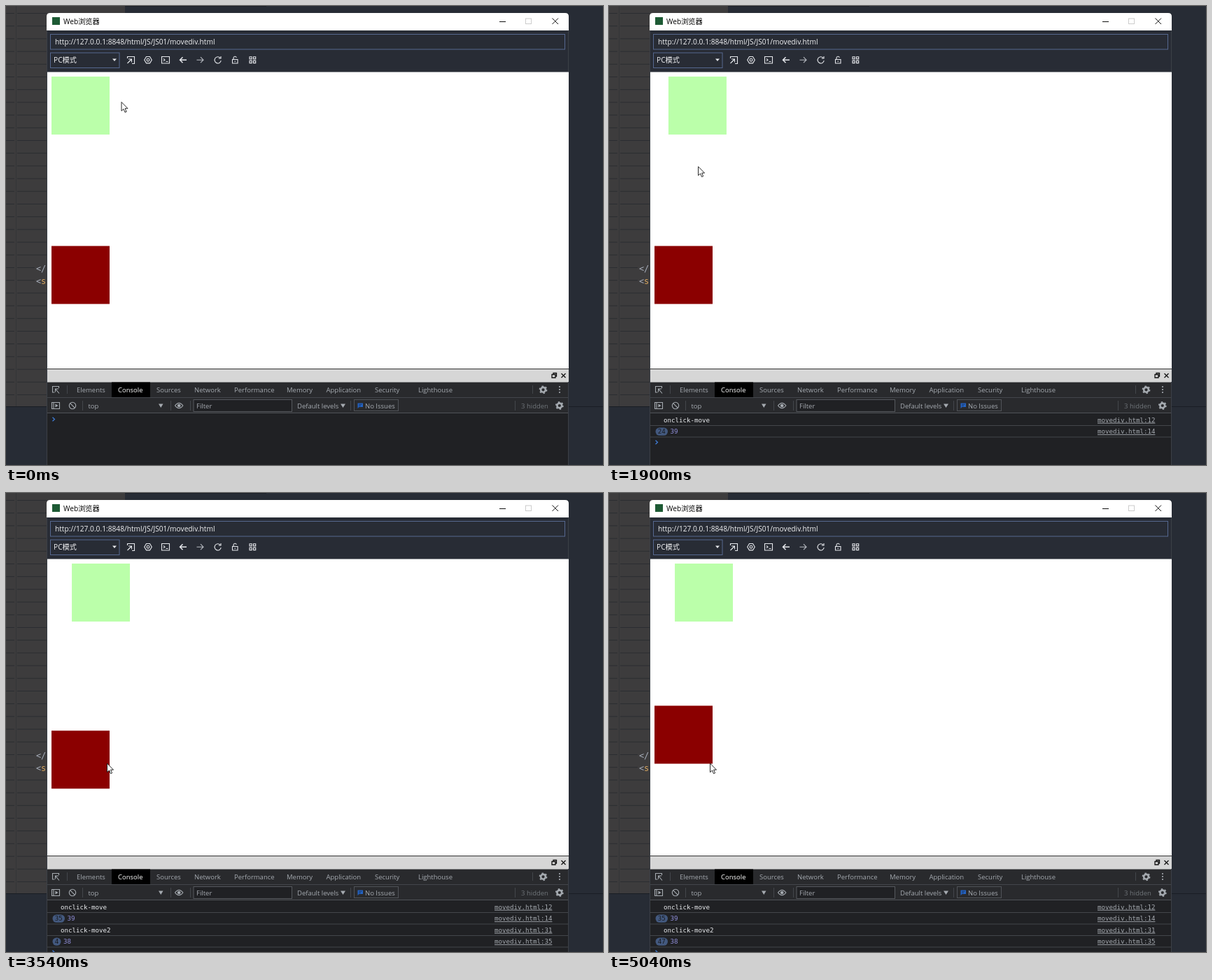
Write an HTML page that moves like this. It is 853 by 657 pixels and loops after 5110 ms.

```html
<!DOCTYPE html>
<html lang="zh-CN">
<head>
<meta charset="utf-8">
<title>movediv</title>
<style>
html, body { margin: 0; width: 100%; height: 100%; overflow: hidden; background: #272c35; }
svg { display: block; width: 100%; height: 100%; }
text { font: 10.2px 'Open Sans', 'Noto Sans CJK SC', 'Noto Sans CJK', sans-serif; white-space: pre; }
.dev text { font-size: 9.5px; fill: #a5aab0; }
.log text, .code text { font-family: 'DejaVu Sans Mono', monospace; }
.log text { font-size: 9.15px; }
.log .msg { fill: #e8eaed; }
.log .link { fill: #a5aab0; text-decoration: underline; }
.log .num { fill: #9190dc; }
.log .count { fill: #191b20; }
.code text { font-size: 11.8px; fill: #a9b0bd; }
.line { fill: none; stroke: #e6e8ec; stroke-width: 1.1; }
.dim { stroke: #a5aab0; }
.rule { fill: none; stroke: #43464b; }
</style>
</head>
<body>
<svg viewBox="0 0 853 657">
  <!-- editor behind the window -->
  <rect width="853" height="657" fill="#272c35"/>
  <rect width="170" height="573" fill="#3d3c3d"/>
  <path d="M170 .5H372" stroke="#1b1f26"/>
  <path d="M0 573.5H853" stroke="#191d24"/>
  <path id="grid" stroke="#2b2d31" fill="none"/>
  <path d="M14.5 0V573" stroke="#343537"/>
  <g class="code">
    <text x="43" y="380">&lt;/</text>
    <text x="43" y="398">&lt;<tspan fill="#d9a760">s</tspan></text>
  </g>

  <!-- browser window -->
  <path d="M58 657V15q0-5 5-5H799q5 0 5 5V657Z" fill="#fff"/>
  <rect x="66" y="16" width="11" height="11" fill="#1d5a34"/>
  <text x="82" y="25.5">Web浏览器</text>
  <g fill="none" stroke="#111">
    <path d="M705 22.5H714M780.500 17.500l8.500 8.500m0-8.500l-8.500 8.500"/>
    <rect x="742.500" y="18" width="8" height="7.500" stroke="#ccc"/>
  </g>
  <rect x="58" y="35" width="746" height="59.500" fill="#282c35"/>
  <g fill="none" stroke="#56688f">
    <rect x="63.500" y="40.500" width="735" height="21.500"/>
    <rect x="63.500" y="67" width="98.500" height="21.500"/>
  </g>
  <text x="70" y="54.700" fill="#f0f1f3">http://127.0.0.1:8848/html/JS/JS01/movediv.html</text>
  <text x="68" y="81.200" fill="#f0f1f3">PC模式</text>
  <path d="M152 75.500h6l-3 3.500Z" fill="#e6e8ec"/>
  <g class="line">
    <path d="M173.500 75V72.500H183.500V82.500H180M173.500 82l6-6m-4.500 0h4.500v4.500"/>
    <path d="M200.500 72.500h5l2.800 4.700-2.800 4.700h-5l-2.800-4.700Z"/>
    <circle cx="203" cy="77.200" r="1.900"/>
    <path d="M222.500 72.500h11v9.500h-11ZM225 75.500l2 1.700-2 1.700M228.500 79.500h3"/>
    <path d="M258 77.200H248.500m4-4l-4 4 4 4" stroke-width="1.500"/>
    <path d="M272.500 77.200H282m-4-4l4 4-4 4" stroke="#b9bdc4"/>
    <path d="M306 74.200a4.600 4.600 0 1 0 1.200 4M307 72v3h-3.200"/>
    <path d="M323.500 76.500h7.500v5.500h-7.500ZM325 76.500V74.500a2.200 2.200 0 0 1 4.300-.7M327.200 78.500v1.600"/>
    <path d="M348 72.700h3.200v3.200h-3.200ZM353.500 72.700h3.200v3.200h-3.200ZM348 78.400h3.200v3.200h-3.200ZM353.500 78.400h3.200v3.200h-3.200Z"/>
  </g>

  <!-- page -->
  <rect id="green" x="65" y="101" width="83" height="83" fill="#bbffaa"/>
  <rect id="red" x="65" y="343.500" width="83" height="83" fill="#8b0000"/>

  <!-- developer tools -->
  <rect x="58" y="519" width="746" height="19.500" fill="#d6d6d6"/>
  <path d="M58 519.500H804" stroke="#333"/>
  <path d="M782 527v-1.500h4.500v4.500h-1.500M780 527.500h5v4.500h-5ZM793.500 526l6 6m0-6l-6 6" fill="none" stroke="#111" stroke-width="1.300"/>
  <rect x="58" y="538.500" width="746" height="44.500" fill="#292a2d"/>
  <rect x="58" y="583" width="746" height="74" fill="#202124"/>
  <rect x="151" y="538.500" width="55" height="21.500" fill="#000"/>
  <path class="rule" d="M58 560.500H804M87.500 543v12M752.500 543v12M109.500 565v14M235.500 565v14M263.500 565v14M492.500 565v14M727.500 565v14"/>
  <path d="M58 582.500H804" stroke="#505358"/>
  <g class="dev">
    <g id="tabs"></g>
    <g class="line dim">
      <path d="M69.500 553H66.500V544.500H75.500V547M70.500 548l5.500 6.500M70.500 552.500V548h4.500"/>
      <path d="M65.500 567.500h11v9h-11ZM68 567.500v9"/>
      <path d="M70.500 569.500l4 2.500-4 2.500Z" fill="#a5aab0" stroke="none"/>
      <circle cx="95" cy="572" r="4.700"/><path d="M91.700 568.700l6.600 6.600"/>
      <path d="M241.500 572q5.700-7.500 11.400 0q-5.700 7.500-11.400 0Z"/>
      <circle cx="247.200" cy="572" r="1.800" fill="#a5aab0"/>
    </g>
    <g id="gears" fill="none" stroke="#a5aab0"></g>
    <path d="M791 545v9.500" stroke="#a5aab0" stroke-width="2.200" stroke-linecap="round" stroke-dasharray="0 4"/>
    <path d="M218 569.500h6.500l-3.250 5.500ZM478 569.500h7l-3.500 5.500Z" fill="#a5aab0"/>
    <rect x="268" y="563.500" width="140.500" height="17" fill="#202124" stroke="#56595e"/>
    <rect x="497.500" y="563.500" width="63" height="16" fill="none" stroke="#505358"/>
    <path d="M502.500 568.500h7.500v5.500h-5.500l-2 2Z" fill="#2463c4"/>
    <path d="M504 570.300h4.500M504 572.300h3" stroke="#15243f" stroke-width=".7"/>
    <text x="117.500" y="575.700">top</text>
    <text x="272" y="576.200">Filter</text>
    <text x="416" y="575.700">Default levels</text>
    <text x="513" y="575.700">No Issues</text>
    <text x="736" y="575.700" style="fill:#6f7479">3 hidden</text>
  </g>
  <g id="log" class="log"></g>
  <path d="M58.500 35V657M803.500 35V94M803.500 538V657" stroke="#3c4047" fill="none"/>
  <path id="cursor" d="M.5.500V13.200L3.500 10.500 5.500 15.200 7.600 14.300 5.600 9.700H9.500Z" fill="#fff" stroke="#111" stroke-width=".9"/>
</svg>
<script>
const LOOP = 5110, TICK = 67, SCALE = 0.83, ROW = 16.5;
const $ = id => document.getElementById(id);
const clamp = (v, lo, hi) => Math.min(hi, Math.max(lo, v));

$('grid').setAttribute('d', Array.from({ length: 31 }, (_, i) => {
  const y = 10.5 + 18.2 * i, end = i === 20 || i === 21 ? 41 : 58;
  return `M0 ${y}H12M16 ${y}H${end}`;
}).join(''));

const tabs = { Elements: 101, Console: 160, Sources: 215, Network: 269, Performance: 326,
  Memory: 401, Application: 457.5, Security: 527, Lighthouse: 589 };
$('tabs').innerHTML = Object.entries(tabs).map(([name, x]) =>
  `<text x="${x}" y="553.3"${name === 'Console' ? ' style="fill:#fff"' : ''}>${name}</text>`).join('');

$('gears').innerHTML = [[767.5, 549.3], [790.8, 572]].map(([x, y]) =>
  `<circle cx="${x}" cy="${y}" r="3.4" stroke-width="2.6"/>
   <circle cx="${x}" cy="${y}" r="5" stroke-width="1.8" stroke-dasharray="2.3 2.936"/>`).join('');

// Number of moves so far: the first one, then two more on each tick.
function moves(t, first, second, last) {
  if (t < first) return 0;
  return t < second ? 1 : Math.min(last, 2 + 2 * Math.floor((t - second) / TICK));
}

// Cursor stops: time, x, y
const stops = [[0, 164.5, 137], [420, 123, 173], [1690, 123, 173],
  [2310, 139.5, 403], [3340, 144, 386.5], [LOOP, 144, 386.5]];

function cursorAt(t) {
  const i = stops.findIndex(s => s[0] > t);
  const [t0, x0, y0] = stops[i - 1], [t1, x1, y1] = stops[i];
  const p = (t - t0) / (t1 - t0), e = p * p * (3 - 2 * p);
  return [x0 + (x1 - x0) * e, y0 + (y1 - y0) * e];
}

function logRow(i, content, line) {
  const y = 595.7 + ROW * i;
  return `<path class="rule" d="M58 ${y + 4.8}H804"/>${content(y)}
    <text class="link" x="698" y="${y}">movediv.html:${line}</text>`;
}

const message = text => y => `<text class="msg" x="78" y="${y}">${text}</text>`;

const counted = (value, n) => y => {
  if (n < 2) return `<text class="num" x="78" y="${y}">${value}</text>`;
  const w = 6.5 + 5.5 * String(n).length;
  return `<rect x="66.5" y="${y - 8.8}" width="${w}" height="11.4" rx="5.7" fill="#43597f"/>
    <text class="count" x="69.7" y="${y}">${n}</text>
    <text class="num" x="${w + 70}" y="${y}">${value}</text>`;
};

let shownLog = '';
function drawLog(t, right, up) {
  const rows = [];
  if (t >= 490) rows.push([message('onclick-move'), 12]);
  if (right) rows.push([counted(39, right), 14]);
  if (t >= 3010) rows.push([message('onclick-move2'), 31]);
  if (up) rows.push([counted(38, up), 35]);
  const html = rows.map(([content, line], i) => logRow(i, content, line)).join('') +
    `<path d="M66.500 ${588.7 + ROW * rows.length}l3 2.800-3 2.800" fill="none" stroke="#3f7fdc" stroke-width="1.200"/>`;
  if (html !== shownLog) $('log').innerHTML = shownLog = html;
}

function draw(now) {
  const t = now % LOOP;
  const frameTime = Math.floor(t / 70 + 0.001) * 70;
  const right = moves(t, 690, 1150, 35);
  const up = moves(t, 3140, 3470, 47);
  $('green').setAttribute('x', 65 + SCALE * right);
  $('red').setAttribute('y', 343.5 - SCALE * up);
  $('cursor').setAttribute('transform', `translate(${cursorAt(frameTime)})`);
  drawLog(t, right, up);
  requestAnimationFrame(draw);
}
draw(performance.now());
</script>
</body>
</html>
```
